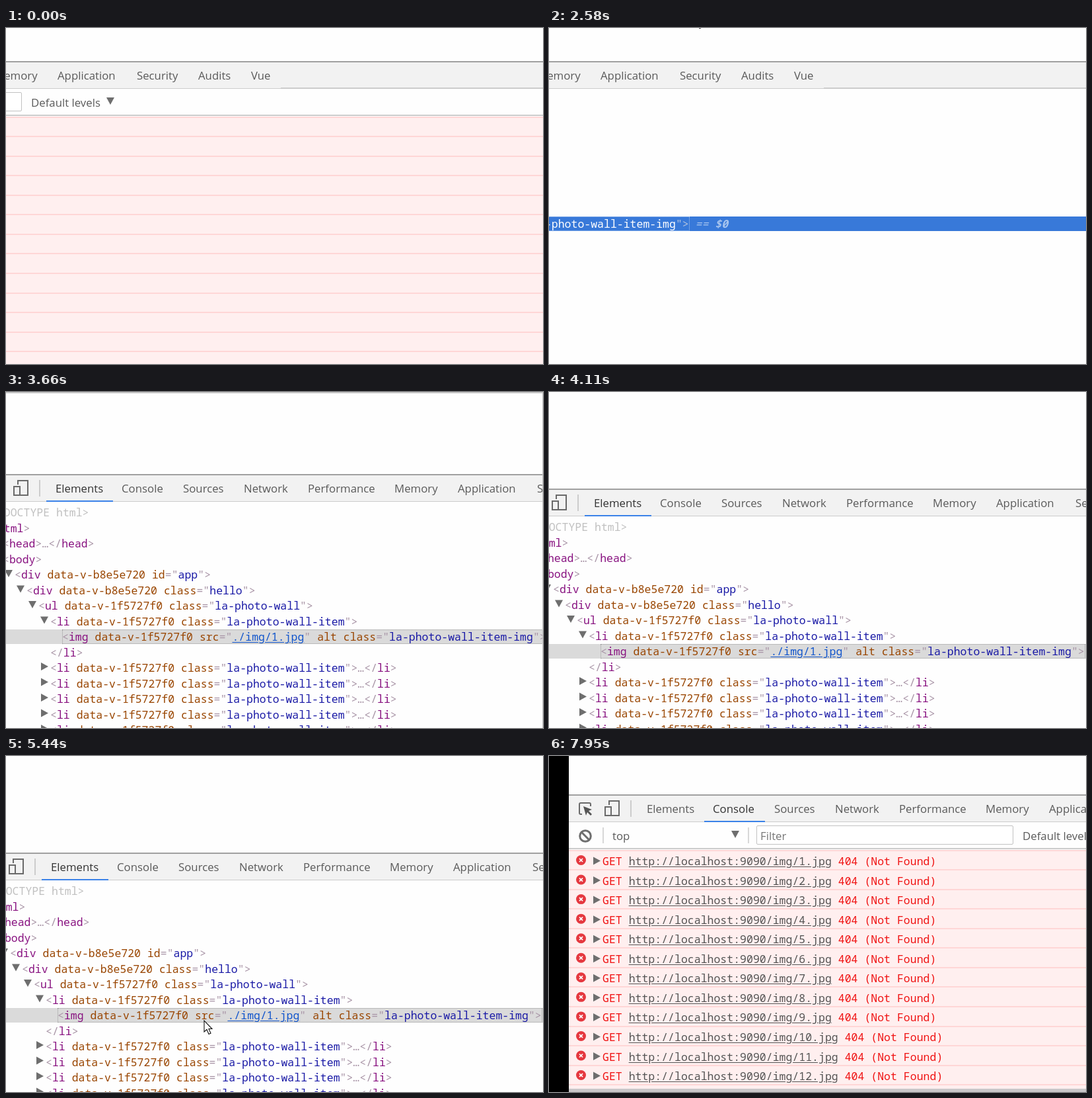
Animation, 813 px wide and 508 px high, one loop 8 s. Source, as an HTML page:

```html
<!DOCTYPE html>
<html lang="en">
<head>
<meta charset="utf-8">
<title>DevTools walkthrough</title>
<style>
  html, body { margin: 0; width: 100%; height: 100%; overflow: hidden; background: #000; }
  #stage { position: relative; width: 813px; height: 508px; overflow: hidden; background: #000; }
  #stage div, #stage svg { position: absolute; }
  #stage svg { left: 0; top: 0; width: 1px; height: 1px; overflow: visible; }
  #win, #elements, #console, #tabs { left: 0; top: 0; width: 1920px; }
  #win { font: 16.8px/24px "Open Sans", "Noto Sans", sans-serif; color: #5a5a5a; white-space: pre; }
  #page { left: 0; top: -300px; width: 1920px; height: 300px; background: #fefefe; }
  #page.lit { background: #a2c4e9; }
  #body { left: 0; top: 0; width: 1920px; height: 900px; background: #fefefe; }
  #bar { left: 0; top: -1px; width: 1920px; height: 41px; box-sizing: border-box; background: #f2f2f2;
    border-top: 2px solid #a0a0a0; }
  .rule { height: 1px; background: #ccc; }
  .tab { top: 9px; }
  .tab.on { color: #333; }
  #under { top: 39px; height: 2px; background: #3b82e8; }
  .mono { font: 16.5px/22px "Noto Sans Mono", "DejaVu Sans Mono", monospace; }
  .fill { left: 0; width: 1920px; height: 22px; }
  #hover { background: #e8f0fb; }
  #sel { background: #dadada; }
  .node { color: #a894a6; }
  .node u { color: #15c; text-underline-offset: 2px; }
  .t { color: #881280; } .a { color: #994500; } .v { color: #1a1aa6; }
  .doc { color: #c0c0c0; }
  .eq { color: #999; font-style: italic; }
  #mark { box-sizing: border-box; border: 1px dotted #999; }
  .focus #sel { background: #3879d9; }
  .focus .img, .focus .img .t, .focus .img .a { color: #b4c4de; }
  .focus .img .v, .focus .img u { color: #fff; }
  .focus .img .eq { color: #a9c6ef; }
  .focus #mark { border-color: #a9c6ef; }
  .err { left: 0; width: 1920px; height: 30px; background: #ffefef; }
  .err::before { content: ""; position: absolute; left: 0; top: 0; width: 100%; height: 2px; background: #ffd6d6; }
  .log { left: 51px; color: #f01414; font-size: 16.53px; }
  .log u { color: #545454; text-underline-offset: 2px; }
  #filter { left: 284px; top: 46px; width: 387px; height: 27px; border: 1.5px solid #c2c2c2; border-radius: 2px; background: #fff; }
  #badge { left: -60px; top: 121px; width: 145px; height: 24px; border-radius: 2px; background: #333740; color: #eee;
    font: 11.7px/24px "Noto Sans Mono", monospace; }
  #badge div { top: 0; }
  #tip { left: 272px; top: 211px; width: 249px; height: 35px; border: 1px solid #c0c0c0; background: #f2f2f2; color: #555;
    box-shadow: 2px 2px 4px #0005; font: 17.1px/36px "Open Sans", "Noto Sans", sans-serif; white-space: pre; text-indent: 12px; }
  #edge { left: 0; top: 0; width: 813px; height: 520px; box-sizing: border-box; border-top: 2px solid #c8c8c8; border-right: 1px solid #c8c8c8; }
  #foot { left: 30px; top: 503px; width: 783px; height: 5px; background: #c9c7c9; }
</style>
</head>
<body>
<div id="stage">
  <div id="win">
    <div id="page"></div>
    <div id="body"></div>
    <div id="elements"></div>
    <div id="console"></div>
    <div id="bar"></div>
    <div class="rule" style="left:0;top:40px;width:1065px"></div>
    <div class="rule" style="left:1065px;top:39px;width:855px;height:2px"></div>
    <div id="tabs"></div>
    <div id="under"></div>
    <svg fill="none" stroke="#6a6a6a" stroke-width="2">
      <path d="M20 29H18Q16 29 16 27V14Q16 12 18 12H31Q33 12 33 14V17"/>
      <path d="M22 17L35 22L30 24L35 29L33 31L28 26L26 31Z" fill="#555" stroke="none"/>
      <path d="M61 15V9H76V31H65M55 18H64V31H55Z"/>
      <path d="M94 8V33" stroke="#ccc"/>
    </svg>
  </div>
  <div id="badge"><div style="left:39px;color:#f0a05a">app</div><div style="left:72px;top:6px;width:1px;height:13px;background:#777"></div><div style="left:80px">1920×173</div></div>
  <div id="tip">e.g. /event\d/ -cdn url:a.com</div>
  <svg id="cursor">
    <path id="arrow" d="M0 0V17L4 13.5L7 20.5L10 19.3L7 12.5H12Z" fill="#fff" stroke="#111" stroke-width="1.1"/>
    <path id="beam" d="M-3 -7H-1L0 -6L1 -7H3M0 -6V6M-3 7H-1L0 6L1 7H3" fill="none" stroke="#111" stroke-width="1.3"/>
  </svg>
  <div id="edge"></div>
  <div id="foot"></div>
</div>
<script>
const $ = id => document.getElementById(id);
const show = (id, on) => { $(id).style.display = on ? '' : 'none'; };
const span = (cls, s) => `<span class="${cls}">${s}</span>`;
const svg = s => `<svg>${s}</svg>`;
const right = (x, y) => `<path d="M${x - 5} ${y - 6}L${x + 6} ${y}L${x - 5} ${y + 6}Z" fill="#6e6e6e"/>`;
const down = (x, y) => `<path d="M${x - 6} ${y - 5}H${x + 6}L${x} ${y + 6}Z" fill="#6e6e6e"/>`;

// Tab strip
const tabs = { Elements: 118, Console: 218, Sources: 311, Network: 403, Performance: 500,
  Memory: 631, Application: 727, Security: 847, Audits: 940, Vue: 1020 };
$('tabs').innerHTML = Object.entries(tabs)
  .map(([name, x]) => `<div class="tab" style="left:${x}px">${name}</div>`).join('');

// Elements tree
const rowTop = i => 46 + 23.5 * i;
const attr = (name, value) => ` ${span('a', name)}="${value}"`;
const open = (tag, rest = '') => `&lt;${span('t', tag)}${rest}&gt;`;
const close = tag => `&lt;/${span('t', tag)}&gt;`;
const scope = id => ' ' + span('a', 'data-v-' + id);
const withClass = (tag, id, cls) => open(tag, scope(id) + attr('class', span('v', cls)));
const wall = '1f5727f0', app = 'b8e5e720';
const item = withClass('li', wall, 'la-photo-wall-item');
const img = open('img', scope(wall) + attr('src', '<u>./img/1.jpg</u>') + ' ' + span('a', 'alt') +
  attr('class', span('v', 'la-photo-wall-item-img'))) + span('eq', ' == <b>$0</b>');
const tree = [
  [20, span('doc', '&lt;!DOCTYPE html&gt;')],
  [20, open('html')],
  [38, open('head') + '…' + close('head'), right],
  [38, open('body'), down],
  [56, open('div', scope(app) + attr('id', span('v', 'app'))), down],
  [74, withClass('div', app, 'hello'), down],
  [92, withClass('ul', wall, 'la-photo-wall'), down],
  [110, item, down],
  [128, img],
  [110, close('li')],
  ...Array(11).fill([110, item + '…' + close('li'), right])
];
$('elements').innerHTML =
  `<div id="hover" class="fill"></div><div id="sel" class="fill" style="top:234px"></div>` +
  `<div id="mark" style="left:128px;top:234px;width:734px;height:22px"></div>` +
  tree.map(([x, html], i) =>
    `<div class="mono node${i === 8 ? ' img' : ''}" style="left:${x}px;top:${rowTop(i)}px">${html}</div>`).join('') +
  svg(tree.map(([x, , icon], i) => icon ? icon(x - 9, rowTop(i) + 9) : '').join('') +
    [4, 10, 16].map(x => `<circle cx="${x}" cy="246" r="1.4" fill="#666"/>`).join(''));

// Console panel
const errors = Array.from({ length: 16 }, (_, i) => i);
const errTop = i => Math.round(82.6 + 29.55 * i);
const label = (x, s) => `<div style="left:${x}px;top:50px">${s}</div>`;
$('console').innerHTML =
  errors.map(i => `<div class="err" style="top:${errTop(i)}px"></div>`).join('') +
  errors.map(i => `<div class="mono log" style="top:${89 + 29.55 * i}px">GET <u>http://localhost:9090/img/${i + 1}.jpg</u> 404 (Not Found)</div>`).join('') +
  `<div class="rule" style="left:0;top:80px;width:1920px;height:2px"></div><div id="filter"></div>` +
  label(66, 'top') + label(290, '<span style="color:#777">Filter</span>') + label(687, 'Default levels') +
  svg(down(252, 59) + down(807, 59) +
    '<path d="M52 49V73M272 49V73" stroke="#ccc" stroke-width="1.5"/>' +
    '<path d="M19 56L31 68" stroke="#6e6e6e" stroke-width="3"/>' +
    '<circle cx="25" cy="62" r="8.3" fill="none" stroke="#6e6e6e" stroke-width="3"/>' +
    errors.map(i => {
      const y = 98.5 + 29.55 * i;
      return `<circle cx="18.5" cy="${y}" r="7.5" fill="#e5383f"/>` +
        `<path d="M16 ${y - 2.5}l5 5m0 -5l-5 5" stroke="#fff" stroke-width="1.7"/>` + right(42, y + 1);
    }).join(''));

const steps = [0, 1150];
for (const [a, b, n] of [[2580, 3120, 4], [3120, 3510, 3], [3660, 4110, 3], [4380, 4770, 3],
  [4770, 5320, 4], [5440, 6400, 7], [6540, 7540, 7], [7660, 7950, 2]])
  for (let k = 0; k <= n; k++) steps.push(a + (b - a) * k / n);

// Paths as time, x, y
const camera = [[2580, -649, 51], [2715, -570, 51], [2850, -340, 52], [2985, -90, 53], [3120, -10, 53],
  [3510, -28, 92], [3660, -43, 125], [3960, -49, 143], [4110, -50, 147],
  [7540, -50, 147], [7660, -38, 134], [7805, 2, 90], [7950, 30, 59]];
const pointer = [[2580, 221, -20], [3375, 221, -20], [3510, 221, -30], [4110, 290, -30], [4380, 308, 30],
  [4640, 335, 250], [4770, 342, 304], [5040, 350, 372], [5320, 322, 445], [5440, 300, 400],
  [5850, 212, 178], [5990, 206, 166], [6126, 214, 176], [6400, 260, 219],
  [6700, 260, 219], [7100, 150, 100], [7400, 70, 2], [7540, 80, -30]];

function at(path, t) {
  if (t <= path[0][0]) return path[0].slice(1);
  const i = path.findIndex(p => p[0] > t);
  if (i < 0) return path[path.length - 1].slice(1);
  const [t0, x0, y0] = path[i - 1], [t1, x1, y1] = path[i];
  const f = (t - t0) / (t1 - t0);
  return [Math.round(x0 + (x1 - x0) * f), Math.round(y0 + (y1 - y0) * f)];
}

function draw(t) {
  const [cx, cy] = at(camera, t), [px, py] = at(pointer, t);
  const inspecting = t >= 1150 && t < 5980;
  const tab = inspecting ? 'Elements' : 'Console';
  $('win').style.transform = `translate(${cx}px, ${cy}px)`;
  show('elements', inspecting);
  show('console', !inspecting);
  $('elements').className = t < 2700 ? 'focus' : '';
  for (const el of $('tabs').children) el.classList.toggle('on', el.textContent === tab);
  $('under').style.left = (inspecting ? 104 : 205) + 'px';
  $('under').style.width = (inspecting ? 101 : 92) + 'px';

  const row = Math.floor((py - cy - 46) / 23.5);
  const over = inspecting && t >= 4380 && row >= 0;
  const lit = over && row >= 3 && row <= 6;
  show('hover', over);
  $('hover').style.top = rowTop(row) + 'px';
  $('page').className = lit ? 'lit' : '';
  show('badge', lit);

  const typing = !inspecting && px >= 234 && py >= 194 && py <= 222;
  show('cursor', t >= 2580);
  $('cursor').style.transform = `translate(${px}px, ${py}px)`;
  show('arrow', !typing);
  show('beam', typing);
  show('tip', t >= 6540 && t < 6800);
  show('edge', t >= 3660 && t < 3800);
  show('foot', t >= 7950);
}

let last = -1;
function tick() {
  const now = performance.now() % 8000;
  const t = Math.max(...steps.filter(s => s <= now));
  if (t !== last) draw(last = t);
  requestAnimationFrame(tick);
}
tick();
</script>
</body>
</html>
```
